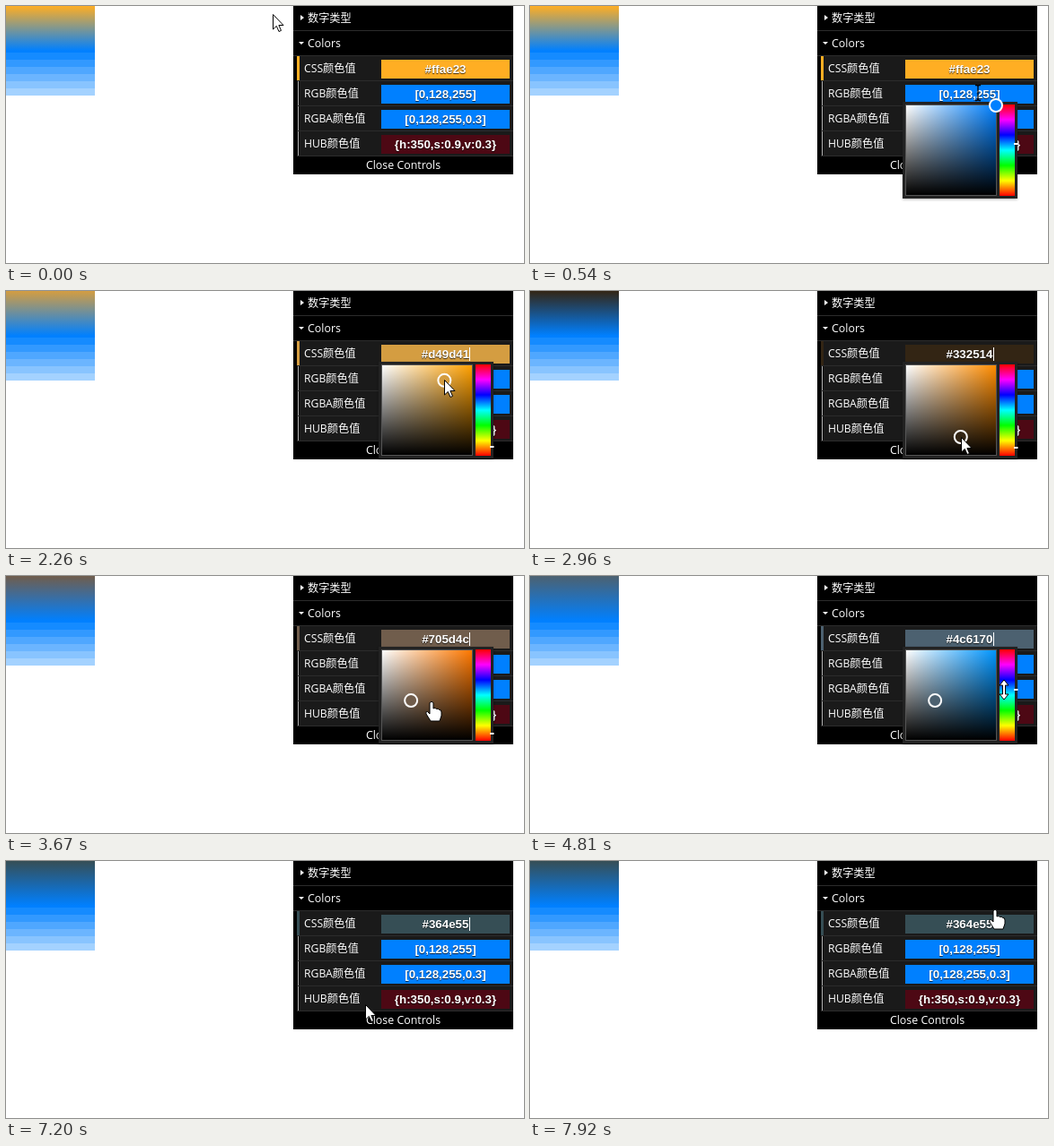
Write an HTML page that moves like this. It is 577 px wide and 287 px high and loops after 8 s.

```html
<!DOCTYPE html>
<html lang="zh">
<head>
<meta charset="utf-8">
<title>Color controls</title>
<style>
  html, body { margin: 0; width: 100%; height: 100%; overflow: hidden; background: #fff; }
  svg { display: block; width: 577px; height: 287px; }
  .label { font: 12.2px "Open Sans", "Noto Sans CJK SC", "Noto Sans CJK", sans-serif; fill: #fff; }
  .value { font: bold 13.33px "Liberation Sans", Arial, sans-serif; fill: #fff;
           text-anchor: middle; text-shadow: 0 1px 1px rgba(0, 0, 0, .75); }
  .cursor { fill: #fff; stroke: #000; stroke-width: 1; stroke-linejoin: round; }
  #ibeam { fill: none; stroke-width: 1.3; }
</style>
</head>
<body>
<svg id="stage" viewBox="0 0 577 287"></svg>
<script>
const LOOP = 8000;
const BLUE = '#0080ff';
const rows = [
  ['CSS颜色值', '#ffae23', '#ffae23'],
  ['RGB颜色值', '[0,128,255]', BLUE],
  ['RGBA颜色值', '[0,128,255,0.3]', BLUE],
  ['HUB颜色值', '{h:350,s:0.9,v:0.3}', '#4d0814']
];

// Bursts of screen updates: first time, last time, number of steps.
const bursts = [
  [120, 1050, 8], [1300, 2260, 8], [2410, 3390, 8], [3520, 4540, 8],
  [4660, 4930, 3], [5210, 6210, 8], [6330, 7330, 8], [7470, 7920, 4]
];
const stepTimes = bursts.flatMap(([a, b, n]) =>
  Array.from({ length: n }, (_, i) => a + (b - a) * i / (n - 1)));

const colorKeys = [
  [0, '#ffae23'], [10, '#ffae23'], [13, '#b8965c'], [16, '#d49d41'],
  [20, '#332514'], [24, '#705d4c'], [28, '#705d4c'], [34, '#4c6170'],
  [37, '#4c6170'], [40, '#14242b'], [43, '#364e55']
].map(([step, hex]) => [step, ...toHsv(hex)]);

const cursorKeys = [
  [0, 297, 9, 'arrow'], [1, 283, 14, 'arrow'], [3, 478, 92, 'ibeam'],
  [4, 499, 97, 'ibeam'], [5, 548, 126, 'ibeam'], [6, 550, 124, 'ibeam'],
  [8, 530, 72, 'ibeam'], [9, 515, 80, 'ibeam'], [10, 505, 83, 'arrow'],
  [24, 451, 139, 'arrow'], [25, 462, 140, 'arrow'], [26, 474, 140, 'hand'],
  [28, 528, 175, 'resize'], [35, 528, 127, 'resize'], [36, 490, 133, 'arrow'],
  [37, 451, 139, 'arrow'], [43, 455, 150, 'arrow'], [44, 436, 140, 'arrow'],
  [45, 400, 128, 'arrow'], [47, 440, 42, 'hand'], [48, 440, 42, 'hand'],
  [50, 400, 160, 'arrow'], [51, 440, 174, 'hand'], [52, 440, 174, 'hand'],
  [53, 400, 120, 'arrow'], [54, 470, 38, 'hand'], [55, 518, 54, 'hand']
];

function toHsv(hex) {
  const [r, g, b] = [1, 3, 5].map(i => parseInt(hex.slice(i, i + 2), 16) / 255);
  const v = Math.max(r, g, b), d = v - Math.min(r, g, b);
  const h = v === r ? (g - b) / d : v === g ? 2 + (b - r) / d : 4 + (r - g) / d;
  return [(h * 60 + 360) % 360, d / v, v];
}

function toHex(h, s, v) {
  return '#' + [5, 3, 1].map(n => {
    const k = (n + h / 60) % 6;
    const c = v - v * s * Math.max(0, Math.min(k, 4 - k, 1));
    return Math.round(c * 255).toString(16).padStart(2, '0');
  }).join('');
}

// Linear track of numeric keys; returns the values and the last key reached.
function track(keys, step) {
  let i = keys.length - 1;
  while (i > 0 && keys[i][0] > step) i--;
  const a = keys[i], b = keys[i + 1] || a;
  const p = b === a ? 0 : (step - a[0]) / (b[0] - a[0]);
  return a.slice(1).map((x, j) => typeof x === 'number' ? x + (b[j + 1] - x) * p : x);
}

const rect = (x, y, w, h, fill, more = '') =>
  `<rect x="${x}" y="${y}" width="${w}" height="${h}" fill="${fill}" ${more}/>`;
const text = (x, y, cls, str, more = '') =>
  `<text x="${x}" y="${y}" class="${cls}" ${more}>${str}</text>`;
const stops = list => list.map((c, i) =>
  `<stop offset="${i / (list.length - 1)}" stop-color="${c}"/>`).join('');

function bands() {
  let out = '';
  for (let i = 0; i < 6; i++) {
    const white = 0.7 * (6 + 8 * i) / 50;
    out += rect(0, 52 + 8 * i, 99, 8,
      `rgb(${Math.round(255 * white)},${Math.round(128 + 127 * white)},255)`);
  }
  return out;
}

function row([label, value, color], i) {
  const y = 56 + 28 * i;
  return rect(327, y, 238, 27, '#1a1a1a') + rect(324, y + 27, 241, 1, '#2c2c2c') +
    (i ? rect(325, y, 1, 27, '#bbb') : rect(324, y, 3, 27, color, 'id="edge"')) +
    text(332, y + 18, 'label', label) +
    rect(418, y + 4, 143, 21, color, i ? '' : 'id="swatch"') +
    text(489.5, y + 19, 'value', value, i ? '' : 'id="hex"');
}

const stage = document.getElementById('stage');
stage.innerHTML = `
<defs>
  <linearGradient id="fade" x2="0" y2="1"><stop id="top"/><stop offset="1" stop-color="${BLUE}"/></linearGradient>
  <linearGradient id="sat"><stop stop-color="#fff"/><stop id="pure" offset="1"/></linearGradient>
  <linearGradient id="dark" x2="0" y2="1"><stop stop-opacity="0"/><stop offset="1"/></linearGradient>
  <linearGradient id="hues" x2="0" y2="1">${stops(['#f00', '#f0f', '#00f', '#0ff', '#0f0', '#ff0', '#f00'])}</linearGradient>
</defs>
${rect(0, 0, 99, 50, 'url(#fade)')}${rect(0, 50, 99, 2, BLUE)}${bands()}
${rect(320, 0, 245, 188, '#000')}
${rect(320, 27, 245, 1, '#2c2c2c')}${rect(320, 55, 245, 1, '#2c2c2c')}
<path d="M328 10L332 13L328 16ZM326 40H332L329 43Z" fill="#fff"/>
${text(336, 18, 'label', '数字类型')}${text(336, 46, 'label', 'Colors', 'style="font-size:12.4px"')}
${rows.map(row).join('')}
${rect(516, 63, 1, 15, '#fff', 'id="caret"')}
${rect(320, 168, 245, 20, '#000', 'id="close"')}
${text(442.5, 182, 'label', 'Close Controls', 'text-anchor="middle" style="font-size:12.4px"')}
<g id="picker">
  ${rect(415, 79, 128, 108, '#222', 'style="filter:drop-shadow(0 1px 1.5px rgba(0,0,0,.3))"')}
  ${rect(418, 82, 102, 102, '#555')}
  ${rect(419, 83, 100, 100, 'url(#sat)')}${rect(419, 83, 100, 100, 'url(#dark)')}
  ${rect(523, 82, 17, 102, 'url(#hues)')}
  ${rect(539, 0, 4.5, 2, '#fff', 'id="mark"')}
  <circle id="knob" r="7" stroke="#fff" stroke-width="2"/>
</g>
<g id="pointer">
  <path id="arrow" class="cursor" d="M.5 .5V17L4.3 13.4L7 19.5L9.5 18.4L6.9 12.5H12Z"/>
  <path id="hand" class="cursor" d="M-2 1.5Q0-1 2 1.5V8Q4 6.5 5.5 8.5Q7.5 7.5 8.5 9.5Q11 9 11 12V16L9 22H-1L-6 14Q-7 11-4.5 11.5L-2 14Z"/>
  <path id="resize" class="cursor" d="M0-11L5-5H1.5V5H5L0 11L-5 5H-1.5V-5H-5Z"/>
  <path id="ibeam" class="cursor" d="M-3-8.5H-1L0-7.5L1-8.5H3M0-7.5V7.5M-3 8.5H-1L0 7.5L1 8.5H3"/>
</g>`;

const el = id => document.getElementById(id);
const set = (id, attrs) => {
  for (const k in attrs) el(id).setAttribute(k, attrs[k]);
};
const show = (id, on) => set(id, { visibility: on ? 'visible' : 'hidden' });

function pickerRow(step) {
  if (step < 3 || step > 44) return -1;
  if (step === 5 || step === 6) return 2;
  return step < 8 ? 1 : 0;
}

function draw(t) {
  const step = stepTimes.filter(s => s <= t).length;
  const hsv = track(colorKeys, step);
  const hex = toHex(...hsv);
  const open = pickerRow(step);

  set('top', { 'stop-color': hex });
  set('edge', { fill: hex });
  set('swatch', { fill: hex });
  el('hex').textContent = hex;
  show('caret', step >= 10 && step < 51);

  const [h, s, v] = open > 0 ? toHsv(BLUE) : hsv;
  const knob = { cx: 419 + 100 * s, cy: 83 + 100 * (1 - v) };
  const hueY = 83 + 100 * (1 - h / 360);
  show('picker', open >= 0);
  set('picker', { transform: `translate(0 ${28 * Math.max(open, 0)})` });
  set('pure', { 'stop-color': toHex(h, 1, 1) });
  set('knob', { ...knob, fill: toHex(h, s, v) });
  set('mark', { y: Math.round(hueY) });

  let [x, y, kind] = track(cursorKeys, step);
  if ((step >= 10 && step <= 24) || (step >= 37 && step <= 43)) {
    x = knob.cx;
    y = knob.cy - 0.5;
  } else if (kind === 'resize') {
    y = hueY + 1;
  }
  set('pointer', { transform: `translate(${Math.round(x)} ${Math.round(y)})` });
  for (const k of ['arrow', 'hand', 'resize', 'ibeam']) show(k, k === kind);
  set('close', { fill: open < 0 && y > 168 ? '#111' : '#000' });
}

const start = performance.now();
function tick(now) {
  draw(Math.max(0, now - start) % LOOP);
  requestAnimationFrame(tick);
}
draw(0);
requestAnimationFrame(tick);
</script>
</body>
</html>
```
